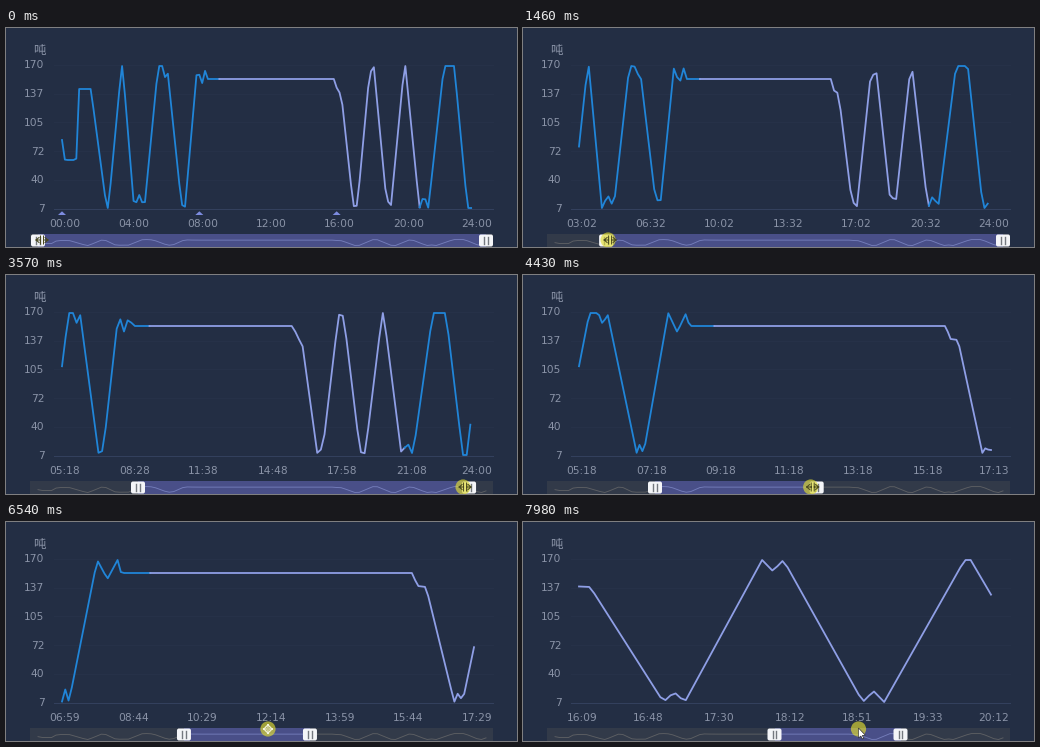
Write a matplotlib script that moves like this. It is 511 px wide and 219 px high and loops after 8 s.

```python
import numpy as np
import matplotlib.pyplot as plt
from matplotlib.animation import FuncAnimation
from matplotlib.patches import Circle, FancyBboxPatch, Polygon, Rectangle

W, H, DPI = 511, 219, 100
STEP_MS, LOOP_MS = 20, 8000
X0, X1 = 56, 468              # first and last category
TOP, BASE = 36.5, 180
DAY = 1440
FLAT = 51                     # plateau height around noon
HIGH, LOW = 38, 180
BG, TEXT = "#232e44", "#8a93a7"
BLUE, PURPLE = "#2085d8", "#8f9fe6"

# tops and bottoms of the load: level, from hour, to hour, depth of the notch between
MORNING = [(LOW, 2.6, 2.7, 0), (HIGH, 3.47, 3.53, 0), (LOW, 4.2, 4.8, 13),
           (HIGH, 5.6, 5.86, 0), (HIGH, 5.86, 6.12, 12), (LOW, 6.98, 7.16, 13),
           (HIGH, 7.88, 8.4, 19)]
EVENING = [(LOW, 16.98, 17.19, 10), (HIGH, 17.95, 18.16, 11), (LOW, 18.94, 19.15, 11),
           (HIGH, 19.94, 20, 0), (LOW, 20.82, 21.34, 13), (HIGH, 22.25, 22.85, 0),
           (LOW, 23.62, 23.85, 0)]


def swings(rows):
    for level, a, b, notch in rows:
        yield a, level
        yield (a + b) / 2, level + (notch if level == HIGH else -notch)
        yield b, level


CURVE = np.array([(0, 112), (.17, 132), (.83, 132), (1, 61), (1.68, 61), *swings(MORNING),
                  (8.49, FLAT), (15.9, FLAT), (16.05, 64), (16.26, 65), *swings(EVENING),
                  (24, 141)])

# slider position -> minute of the day; few records at night and around noon
MINUTES = np.array([(32, 0), (37, 110), (238, 550), (243, 956), (304, 1049), (480, DAY)])


def at(keys, x):
    return np.interp(x, keys[:, 0], keys[:, 1])


def ramp(ms, a, b):
    return np.clip((ms - a) / (b - a), 0, 1)


def smooth(ms, a, b):
    u = ramp(ms, a, b)
    return u * u * (3 - 2 * u)


def window_edges(ms):
    pan = 119.5 * ramp(ms, 5690, 7900)
    left = 32 + 100 * ramp(ms, 732, 2000) ** 1.21 + pan
    right = 480 - 186.3 * smooth(ms, 3400, 4260) - 35.7 * smooth(ms, 4480, 5000) + pan
    return left, right


def clock(minute):
    return f"{minute // 60:02d}:{minute % 60:02d}"


fig = plt.figure(figsize=(W / DPI, H / DPI), dpi=DPI, facecolor=BG)
ax = fig.add_axes([0, 0, 1, 1])
ax.set(xlim=(0, W), ylim=(H, 0))
ax.axis("off")


def px(n):
    return n * 72 / DPI


def label(x, y, s, ha="center", size=10.6, font="DejaVu Sans"):
    return ax.text(x, y, s, ha=ha, va="center_baseline", color=TEXT,
                   fontsize=px(size), family=font)


def stroke(color, width, z=2, **kw):
    return ax.plot([], [], color=color, lw=px(width), zorder=z, **kw)[0]


# fixed axis parts
label(39.5, 20.7, "吨", "right", 12.5, "Noto Sans CJK JP")
for i, value in enumerate((170, 137, 105, 72, 40, 7)):
    y = TOP + i * (BASE - TOP) / 5
    label(38.5, y, str(value), "right")
    ax.plot([48, 487], [y + .5] * 2, color="#33405d" if value == 7 else "#263148",
            lw=px(1), zorder=1)

parts = [stroke(c, 1.8, solid_joinstyle="round") for c in (BLUE, PURPLE, BLUE)]
ticks = [label(0, 195.3, "") for _ in range(7)]
marks = [Polygon([(0, 0)] * 3, color="#7d8ce0", lw=0) for _ in range(3)]
for m in marks:
    ax.add_patch(m)

# slider
ax.add_patch(Rectangle((24, 206), 463, 13, color="#323a49", lw=0, zorder=2))
window = Rectangle((32, 206), 448, 13, color="#494f88", lw=0, zorder=3)
ax.add_patch(window)
hours = np.linspace(0, 24, 100)
shadow_x, shadow_y = 32 + hours / 24 * 448, 210 + at(CURVE, hours) / 24
ax.plot(shadow_x, shadow_y, color="#5d5f63", lw=px(.9), zorder=2.5)
shadow, = ax.plot(shadow_x, shadow_y, color="#747dba", lw=px(.9), zorder=4)


def make_handle():
    box = FancyBboxPatch((0, 206.5), 14, 12, boxstyle="round,pad=0,rounding_size=2",
                         fc="#f4f5f8", ec="none", zorder=5)
    ax.add_patch(box)
    return box, stroke("#74787f", 1.4, 6)


def place_handle(handle, x):
    box, grip = handle
    box.set_x(x - 7)
    grip.set_data([x - 1.7, x - 1.7, np.nan, x + 1.7, x + 1.7],
                  [208.5, 216, np.nan, 208.5, 216])


handles = [make_handle(), make_handle()]

# mouse pointer
halo = Circle((0, 0), 7.6, color="#e0dc32", alpha=.66, lw=0, zorder=7)
ax.add_patch(halo)
arrow = Polygon([(0, 0)] * 3, fc="white", ec="#222222", lw=px(.6), zorder=9)
ax.add_patch(arrow)
glyph = stroke("#4a4a20", 1, 8)

GAP = (np.nan, np.nan)
HEAD = np.array([(3, -2.5), (6, 0), (3, 2.5), GAP, (1.5, 0), (6, 0), GAP])
RESIZE = np.vstack([HEAD, -HEAD, [(-1.5, -4), (-1.5, 4), GAP, (1.5, -4), (1.5, 4)]])
MOVE = .75 * np.vstack([HEAD, -HEAD, HEAD[:, ::-1], -HEAD[:, ::-1]])
ARROW = np.array([(0, -1), (0, 9), (2.3, 7), (4, 10), (5.3, 9.3), (3.8, 6.4), (6.8, 6.2)])


def draw_chart(lo, hi):
    span = hi - lo
    step = 10 if span > 720 else 5 if span > 360 else 3
    n = -(-span // step)
    k = np.arange(n if hi == DAY else n + 1)
    t = np.minimum(lo + k * step, hi)
    x, y = X0 + (X1 - X0) * k / n, at(CURVE, t / 60)
    a, b = np.searchsorted(t, (550, 1250))
    for line, cut in zip(parts, (slice(0, a + 1), slice(a, b + 1), slice(b, None))):
        line.set_data(x[cut], y[cut])

    for i, tick in enumerate(ticks):
        j = min(i * (n + 1) // 6, n)
        tick.set_text(clock(min(lo + j * step, hi)))
        tick.set_x(X0 + 3 + (X1 - X0) * j / n)

    # shift changes show only where they fall on a category
    for i, mark in enumerate(marks):
        off = i * 480 - lo
        mark.set_visible(0 <= off < span and off % step == 0)
        mx = X0 + (X1 - X0) * off / step / n
        mark.set_xy([(mx - 4, 187), (mx, 183.3), (mx + 4, 187)])


def draw_mouse(ms, left, right):
    x = left + 2
    x += smooth(ms, 2600, 3150) * (right - 6 - x)
    to_pan = smooth(ms, 5150, 5500)
    x += to_pan * (left + 84 - x)
    pos = np.array([x, 212 - 5 * to_pan])
    halo.center = pos
    halo.set_visible(390 <= ms < 2470 or 3350 <= ms < 5050 or ms >= 5500)
    moving = 5500 <= ms < 7900
    pointing = 2600 <= ms < 3150 or 5150 <= ms < 5500 or ms >= 7900
    arrow.set_visible(pointing)
    arrow.set_xy(pos + ARROW)
    glyph.set_visible(not pointing)
    glyph.set_color("#f2f2dc" if moving else "#4a4a20")
    glyph.set_data(*(pos + (MOVE if moving else RESIZE + (2, 0))).T)


def draw(frame):
    ms = frame * STEP_MS
    left, right = window_edges(ms)
    window.set_x(left)
    window.set_width(right - left)
    shadow.set_clip_path(window)
    place_handle(handles[0], left)
    place_handle(handles[1], right)
    seen = ms - (160 if ms < 5300 else 0)   # chart trails the handles
    draw_chart(*(int(round(at(MINUTES, edge))) for edge in window_edges(seen)))
    draw_mouse(ms, left, right)
    return []


anim = FuncAnimation(fig, draw, frames=LOOP_MS // STEP_MS, interval=STEP_MS,
                     init_func=lambda: draw(0), repeat=True, repeat_delay=0)
plt.show()
```
